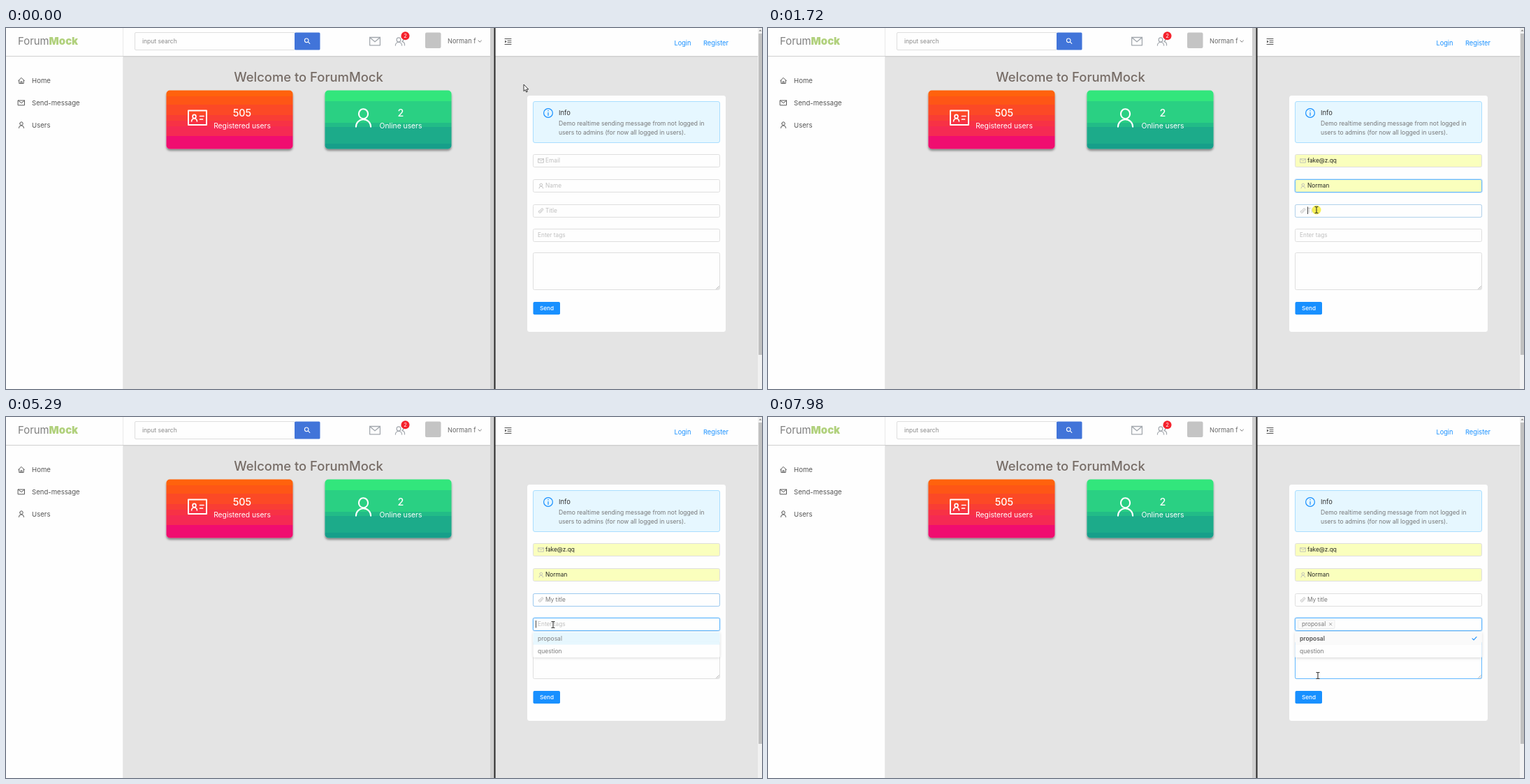
An HTML page for the animation above (8 s loop, 1082 by 518 pixels).

```html
<!DOCTYPE html>
<html lang="en">
<head>
<meta charset="utf-8">
<title>Dashboard and message form</title>
<style>
html, body { margin: 0; width: 100%; height: 100%; overflow: hidden; background: #e4e4e4; }
svg { display: block; width: 1082px; height: 518px; font-family: Inter, "Open Sans", sans-serif; }
text { white-space: pre; }
.line { fill: none; stroke-linecap: round; stroke-linejoin: round; }
</style>
</head>
<body>
<svg id="stage" viewBox="0 0 1082 518"></svg>
<script>
const LOOP = 8000;
const BLUE = '#1890ff', HOVER = '#62b8ff', HINT = '#bfbfbf', INK = '#595959', PAPER = '#fefefe';

// Markup helpers
const rect = (x, y, w, h, fill, more = '') =>
  `<rect x="${x}" y="${y}" width="${w}" height="${h}" fill="${fill}" ${more}/>`;
const text = (x, mid, str, size, fill, more = '') =>
  `<text x="${x}" y="${mid + size * 0.36}" font-size="${size}" fill="${fill}" ${more}>${str}</text>`;
const line = (d, stroke, width = 1, more = '') =>
  `<path class="line" d="${d}" stroke="${stroke}" stroke-width="${width}" ${more}/>`;
const mail = (x, y, w, h, c, sw) =>
  line(`M${x} ${y}h${w}v${h}h${-w}zl${w / 2} ${h * 0.55}l${w / 2} ${-h * 0.55}`, c, sw);
const user = (x, y, s, c, sw) =>
  line(`M${x - s} ${y + s * 1.75}a${s} ${s} 0 0 1 ${2 * s} 0M${x - s * 0.62} ${y}` +
    `a${s * 0.62} ${s * 0.66} 0 1 1 ${s * 1.24} 0a${s * 0.62} ${s * 0.66} 0 1 1 ${-s * 1.24} 0`, c, sw);
const bands = (id, stops) => {
  const rows = stops.map(([from, color], i) => {
    const end = i + 1 < stops.length ? stops[i + 1][0] : 84;
    return `<stop offset="${from / 84}" stop-color="${color}"/><stop offset="${end / 84}" stop-color="${color}"/>`;
  });
  return `<linearGradient id="${id}" x2="0" y2="1">${rows.join('')}</linearGradient>`;
};

const defs = `<defs>
  ${bands('warm', [[0, '#ff6207'], [8, '#fe5714'], [21, '#fc4a25'], [36, '#f93e34'],
    [44, '#f73344'], [52, '#f52952'], [66, '#f01170']])}
  ${bands('cool', [[0, '#30e67c'], [15, '#29d083'], [46, '#22bc87'], [53, '#1bab8a'], [77, '#189f8a']])}
  <filter id="lift" x="-10%" y="-10%" width="120%" height="130%">
    <feDropShadow dx="0" dy="2.5" stdDeviation="1.6" flood-opacity=".42"/></filter>
  <filter id="menuShadow" x="-5%" y="-20%" width="110%" height="150%">
    <feDropShadow dx="0" dy="1" stdDeviation="2" flood-opacity=".17"/></filter>
</defs>`;

const sidebar = rect(0, 0, 168, 518, PAPER) + rect(167, 0, 1, 518, '#e9e9e9') +
  line('M17.6 75.8L22 71.4l4.4 4.4M18.8 75v4.6h6.4V75M21 79.5v-2.6h2v2.6', INK) +
  mail(17.5, 104, 9, 6.8, INK, 1) +
  user(22, 137.2, 3.6, INK, 1) +
  ['Home', 'Send-message', 'Users'].map((s, i) => text(37, 75.7 + i * 31.8, s, 9.6, '#555')).join('');

const header = rect(168, 0, 525, 40, PAPER) +
  rect(0, 40, 693, 1, '#d0d0d0') + rect(168, 41, 525, 1, '#dadada') +
  `<text x="17" y="24" font-size="14.9" fill="#808080">Forum<tspan font-weight="900" fill="#b1d17d">Mock</tspan></text>` +
  rect(184.5, 6.5, 229, 25, PAPER, 'rx="1.5" stroke="#dedede"') +
  text(195, 19.3, 'input search', 8.5, '#8a8a8a') +
  rect(413, 6.5, 36.5, 25, '#4174d9', 'rx="1.5"') +
  line('M432.6 20.2l2.2 2.2M427.4 17.8a2.8 2.8 0 1 1 5.6 0a2.8 2.8 0 1 1 -5.6 0', '#fff', 1.1) +
  mail(520.6, 13.5, 14.8, 11.3, '#a3a8ae', 1.3) +
  user(562, 17, 4.6, '#a3a8ae', 1.2) +
  line('M565.5 13a3.3 3.3 0 0 1 1.4 6.3a5 5 0 0 1 3.6 5.5', '#a3a8ae', 1.2) +
  '<circle cx="571.5" cy="11.3" r="6" fill="#f5222d"/>' +
  text(571.5, 11.4, '2', 7.5, '#fff', 'text-anchor="middle"') +
  rect(600, 6.5, 22.5, 22.5, '#c4c4c4', 'rx="2"') +
  text(632, 18.5, 'Norman f', 9.2, '#666') +
  line('M676 18l2.2 2.2l2.2 -2.2', '#777', 1);

const card = (x, fill, icon, cx, count, label) =>
  rect(x, 89.5, 181, 84, `url(#${fill})`, 'rx="5" filter="url(#lift)"') + icon +
  text(cx, 122, count, 14.3, '#fff', 'text-anchor="middle" font-weight="500"') +
  text(cx, 140.6, label, 10.3, '#fff', 'text-anchor="middle"');
const idIcon = line('M261 118.5h26v20.5h-26z', '#fff', 2) + user(269.5, 127, 3.9, '#fff', 1.7) +
  line('M277.5 126.5h5.5M277.5 131h4', '#fff', 1.7);
const main = text(433, 70, 'Welcome to ForumMock', 18.4, '#766c66', 'text-anchor="middle" font-weight="500"') +
  card(229.5, 'warm', idIcon, 338, '505', 'Registered users') +
  card(456.5, 'cool', user(511.5, 123.2, 10.6, '#fff', 2.1), 565, '2', 'Online users');

const divider = rect(693, 0, 6, 518, '#cfcfcf') + rect(698.5, 0, 2, 518, '#262626');

const rightBar = rect(700, 0, 376, 40, PAPER) + rect(700, 40, 376, 1, '#d0d0d0') +
  rect(700, 41, 376, 1, '#dadada') +
  line('M714 15.5h9M718 18.2h5M718 20.8h5M714 23.5h9', '#555', 1, 'stroke-linecap="butt"') +
  '<path d="M714 17.5l2.6 2l-2.6 2z" fill="#555"/>' +
  text(956.5, 22, 'Login', 9.2, BLUE) + text(998, 22, 'Register', 9.3, BLUE) +
  rect(1076, 0, 6, 518, '#f1f1f1') + rect(1077, 8, 5, 461, '#c1c1c1') +
  '<path d="M1077.5 4.5l2 -2l2 2z" fill="#777"/>';

const info = rect(754.5, 105.5, 267, 59, '#e6f7ff', 'rx="2.5" stroke="#a9deff"') +
  '<circle cx="776" cy="122" r="6.4" fill="none" stroke="#1890ff" stroke-width="1.2"/>' +
  line('M776 121.5v4', BLUE, 1.2) + '<circle cx="776" cy="118.8" r=".8" fill="#1890ff"/>' +
  text(791, 121.2, 'Info', 9.4, '#333') +
  text(791, 136.8, 'Demo realtime sending message from not logged in', 8.55, '#777') +
  text(791, 149.5, 'users to admins (for now all logged in users).', 8.55, '#777');

// Active: [from, to] of the blue border; glow: [from, to] of keyboard focus
const fields = [
  { y: 181.5, h: 18, active: [480, 1180], glow: [520, 1180] },
  { y: 217.5, h: 18, active: [880, 1710], glow: [1190, 1710] },
  { y: 253.5, h: 18, active: [1650, 5150], glow: [1710, 5150] },
  { y: 288.5, h: 18, active: [5080, 9e3], glow: [5150, 9e3] },
  { y: 322.5, h: 53, active: [7640, 9e3], glow: [9e3, 9e3] }
];
const box = (f, i) => {
  const edge = more => rect(754.5, f.y, 267, f.h, 'none', 'rx="2" ' + more);
  return rect(754.5, f.y, 267, f.h, PAPER, `id="fill${i}" rx="2" stroke="#dedede"`) +
    rect(753.5, f.y - 1, 269, f.h + 2, 'none', `id="glow${i}" rx="2.5" stroke="${BLUE}" stroke-opacity=".22"`) +
    edge(`id="edge${i}" stroke="${HOVER}"`);
};
const form = rect(746, 97, 284, 339, PAPER, 'rx="3.5"') + info + fields.map(box).join('') +
  mail(762, 187.8, 7.4, 5.4, '#b8b8b8', 0.8) + user(765.8, 225, 2.9, '#b8b8b8', 0.8) +
  line('M763 263l3.2 -3.6a1.4 1.4 0 0 1 2.2 2l-3.3 3.6a1.8 1.8 0 0 1 -2.5 -2.5M764.5 263.7l2.7 -3', '#b8b8b8', 0.8) +
  [['email', 772, 190.3], ['name', 772, 226], ['title', 772, 261.8], ['hint', 761, 297.3]]
    .map(([id, x, y]) => text(x, y, '', 8.3, HINT, `id="${id}"`)).join('') +
  line('M1016.5 374.5l4 -4M1018.8 374.5l1.7 -1.7', '#999', 0.7) +
  rect(754.5, 393, 38.5, 18.3, BLUE, 'rx="2"') +
  text(774, 402.2, 'Send', 8.2, '#fff', 'text-anchor="middle" font-weight="500"') +
  `<g id="tag">${rect(758.5, 291, 52.5, 12.5, '#fafafa', 'rx="1.5" stroke="#e8e8e8" stroke-width=".8"')}
    ${text(764, 297.3, 'proposal', 8.3, '#777')}${line('M803.5 295.6l3.4 3.4m0 -3.4l-3.4 3.4', '#888', 0.8)}</g>` +
  rect(0, 0, 1, 10.5, '#444', 'id="caret"') +
  `<g id="menu">${rect(754.5, 308, 267, 37, PAPER, 'rx="2" filter="url(#menuShadow)"')}` +
  ['proposal', 'question'].map((s, i) => rect(754.5, 309 + i * 18, 267, 18, PAPER, `id="row${i}"`) +
    text(761, 317.8 + i * 18, s, 8.5, '#777', `id="option${i}"`) +
    line(`M1008 ${317.8 + i * 18}l2.1 2.1l3.9 -4.2`, '#333', 1.1, `id="check${i}"`)).join('') + '</g>';

const pointer = `<circle id="press" r="6.5" fill="#f4ee3c" fill-opacity=".85"/>
  <path id="arrow" d="M0 0v9.6l2.2 -2l1.5 3.4l1.6 -.7l-1.5 -3.3h3z" fill="#fff" stroke="#222" stroke-width=".9"/>
  <path id="beam" class="line" d="M-2 -4.5h1.3l.7 .6l.7 -.6h1.3M0 -4v8M-2 4.5h1.3l.7 -.6l.7 .6h1.3" stroke="#222"/>
  <path id="hand" d="M-1.2 .6q1.2 -1.4 2.3 0v4.2l3.2 .7q1.5 .5 1.2 2.2l-.9 4.8h-5.4l-3.6 -5.2q.6 -1.5 2 -.4l1.2 1z" fill="#fff" stroke="#222" stroke-width=".9"/>`;

const stage = document.getElementById('stage');
stage.innerHTML = defs + rect(0, 0, 1082, 518, '#e4e4e4') + main + sidebar + header +
  rightBar + divider + form + pointer;

const el = id => document.getElementById(id);
const set = (id, attrs) => { for (const k in attrs) el(id).setAttribute(k, attrs[k]); };
const show = (id, on) => set(id, { visibility: on ? 'visible' : 'hidden' });
const clamp = v => Math.max(0, Math.min(1, v));
const during = (t, [a, b], fade) => clamp((t - a) / 200) - clamp((t - b) / fade);
const write = (id, str, fill) => { el(id).textContent = str; set(id, { fill }); };

// Pointer stops: time, x, y
const path = [[0, 741, 81], [140, 741, 81], [500, 778, 190], [680, 778, 190], [820, 783, 212],
  [870, 783, 212], [940, 780, 231], [1110, 780, 231], [1180, 780, 228], [1260, 780, 228],
  [1420, 786, 247], [1510, 786, 247], [1700, 785, 261], [4500, 785, 261], [4880, 777, 288],
  [5100, 783, 298], [5340, 783, 298], [5780, 788, 325], [6040, 788, 325], [6120, 789, 329],
  [6270, 788, 320], [7290, 788, 320], [7980, 787, 371], [LOOP, 787, 371]];
const clicks = [520, 840, 1190, 1470, 1710, 5130, 6900];
const typed = [[1870, 'My'], [2230, 'My '], [2970, 'My t'], [3250, 'My ti'], [3350, 'My tit'],
  [3530, 'My titl'], [3760, 'My title']];

function pointerAt(t) {
  const i = path.findIndex(p => p[0] > t);
  const [a, x, y] = path[i - 1], [b, nx, ny] = path[i];
  const u = (t - a) / (b - a), k = u * u * (3 - 2 * u);
  return [x + (nx - x) * k, y + (ny - y) * k];
}

function drawFields(t) {
  fields.forEach((f, i) => {
    set('edge' + i, { opacity: during(t, f.active, 300) });
    set('glow' + i, { opacity: during(t, f.glow, 140) });
  });
  const mailed = t >= 860, named = t >= 1490;
  set('fill0', { fill: mailed ? '#faffbd' : PAPER });
  set('fill1', { fill: named ? '#faffbd' : PAPER });
  write('email', mailed ? 'fake@z.qq' : 'Email', mailed ? '#222' : HINT);
  write('name', named ? 'Norman' : 'Name', named ? '#222' : HINT);
  const last = typed.filter(s => s[0] <= t).pop();
  write('title', last ? last[1] : 'Title', last ? '#777' : HINT);
  write('hint', t < 7080 ? 'Enter tags' : '', HINT);
  show('tag', t >= 7080);

  // The caret blinks from the latest key press or focus
  const inTitle = t >= 1710 && t < 5150, inTags = t >= 5150 && t < 7080;
  const since = inTags ? 5150 : last ? last[0] : 1710;
  const x = inTags ? 758 : 772.3 + (last ? el('title').getComputedTextLength() : 0);
  set('caret', { x: Math.round(x), y: inTags ? 292 : 256.5 });
  show('caret', (inTitle || inTags) && Math.floor((t - since) / 530) % 2 === 0);
}

function drawMenu(t, y) {
  const open = 1 - (1 - clamp((t - 5150) / 220)) ** 3;
  show('menu', t >= 5150);
  set('menu', { opacity: open, transform: `translate(0 308) scale(1 ${0.8 + 0.2 * open}) translate(0 -308)` });
  const over = t < 5340 ? -1 : y >= 309 && y < 327 ? 0 : y >= 327 && y < 345 ? 1 : -1;
  const picked = t >= 7080;
  for (const i of [0, 1]) {
    const chosen = picked && i === 0;
    const lit = over === i || (!picked && over < 0 && i === 0);
    set('row' + i, { fill: lit ? '#e6f7ff' : chosen ? '#fafafa' : PAPER });
    set('option' + i, { 'font-weight': chosen ? 600 : 400, fill: chosen ? '#555' : '#777' });
    set('check' + i, { stroke: chosen ? BLUE : '#333', opacity: chosen || over === i ? 1 : 0 });
  }
}

function drawPointer(t, x, y) {
  const inMenu = t >= 5340 && y > 308 && y < 345;
  const suggesting = (t > 680 && t < 870 && y > 200) || (t > 1260 && t < 1510 && y > 236);
  const inField = !suggesting && fields.some(f => y > f.y && y < f.y + f.h);
  const kind = inMenu ? 'hand' : inField ? 'beam' : 'arrow';
  for (const id of ['arrow', 'beam', 'hand', 'press']) {
    set(id, { transform: `translate(${Math.round(x)} ${Math.round(y)})` });
    show(id, id === kind);
  }
  show('press', clicks.some(c => t >= c && t < c + 150));
}

function frame(now) {
  const t = now % LOOP;
  const [x, y] = pointerAt(t);
  drawFields(t);
  drawMenu(t, y);
  drawPointer(t, x, y);
}

const start = performance.now();
const tick = now => { frame(Math.max(0, now - start)); requestAnimationFrame(tick); };
frame(0);
requestAnimationFrame(tick);
</script>
</body>
</html>
```
